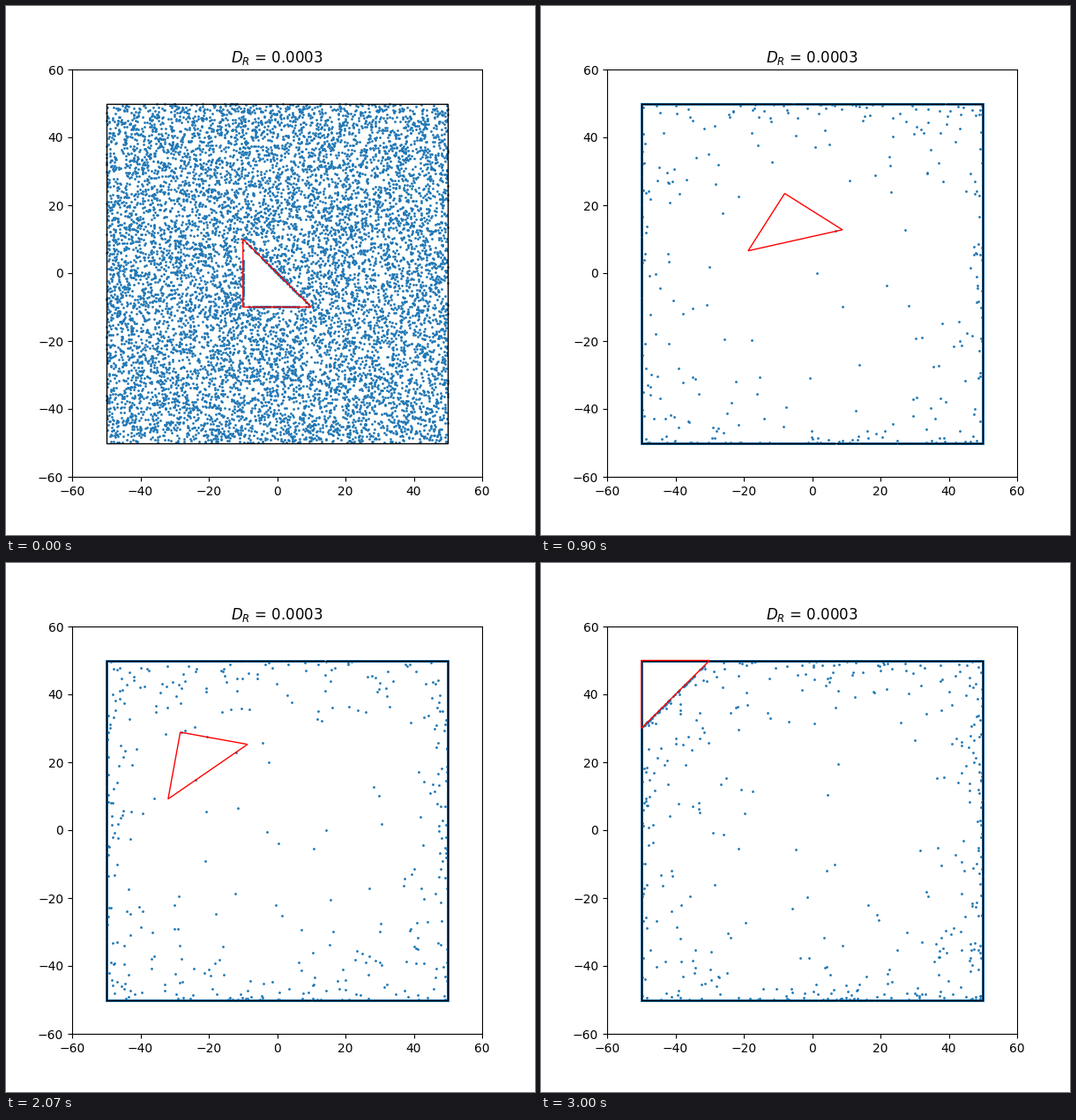
A matplotlib script for the animation above (3030 ms loop, 600 by 600 pixels).

```python
import numpy as np
import matplotlib.pyplot as plt
from matplotlib.animation import FuncAnimation
from matplotlib.patches import Polygon, Rectangle

FRAMES, INTERVAL = 101, 30
COUNT, HALF = 10000, 50
SPEED, D_ROT, SUBSTEPS = 7.0, 0.03, 8    # per frame

# Obstacle pose: time, centroid x, centroid y, turn in degrees
POSES = np.array([
    (0, -3.33, -3.33, 0),
    (21, -3.13, 11.33, -124.7),
    (39, -8.80, 17.23, -120),
    (53, -14.93, 24.00, -116.2),
    (69, -22.97, 21.10, -100.3),
    (82, -31.27, 24.87, -100.4),
    (98, -43.33, 43.33, -90),
])
SHAPE = np.array([(-10, 10), (-10, -10), (10, -10)]) + 10 / 3


def triangle(t):
    x, y, turn = (np.interp(t, POSES[:, 0], col) for col in POSES[:, 1:].T)
    c, s = np.cos(np.radians(turn)), np.sin(np.radians(turn))
    return SHAPE @ np.array([(c, s), (-s, c)]) + (x, y)


def push_out(pos, tri):
    """Move points inside the triangle to its nearest reachable edge."""
    edges = np.roll(tri, -1, axis=0) - tri
    normals = np.stack([edges[:, 1], -edges[:, 0]], axis=1)
    normals /= np.linalg.norm(normals, axis=1, keepdims=True)
    depth = np.einsum('pej,ej->pe', tri - pos[:, None], normals)
    hit = np.flatnonzero((depth > 0).all(axis=1))
    landing = pos[hit, None] + depth[hit, :, None] * normals
    blocked = (np.abs(landing) > HALF - 0.3).any(axis=2)
    best = np.argmin(depth[hit] + 1000 * blocked, axis=1)
    pos[hit] = landing[np.arange(len(hit)), best]


def simulate():
    rng = np.random.default_rng(3)
    pos = rng.uniform(-HALF, HALF, (COUNT, 2))
    heading = rng.uniform(0, 2 * np.pi, COUNT)
    push_out(pos, triangle(0))
    track = [pos.copy()]
    for step in range(1, (FRAMES - 1) * SUBSTEPS + 1):
        heading += rng.normal(0, np.sqrt(2 * D_ROT / SUBSTEPS), COUNT)
        pos += SPEED / SUBSTEPS * np.stack([np.cos(heading), np.sin(heading)], axis=1)
        np.clip(pos, -HALF, HALF, out=pos)
        push_out(pos, triangle(step / SUBSTEPS))
        np.clip(pos, -HALF, HALF, out=pos)
        if step % SUBSTEPS == 0:
            track.append(pos.copy())
    return track


track = simulate()

fig, ax = plt.subplots(figsize=(6, 6), dpi=100)
ax.set(xlim=(-60, 60), ylim=(-60, 60))
ax.set_title(r'$D_R$ = 0.0003')
dots, = ax.plot([], [], 'o', ms=1, color='C0', zorder=2)
ax.add_patch(Rectangle((-HALF, -HALF), 2 * HALF, 2 * HALF, fill=False, ec='k', lw=1, zorder=3))
obstacle = ax.add_patch(Polygon(triangle(0), fill=False, ec='r', lw=1, zorder=4))


def update(i):
    dots.set_data(*track[i].T)
    obstacle.set_xy(triangle(i))
    return dots, obstacle


anim = FuncAnimation(fig, update, frames=FRAMES, interval=INTERVAL, repeat=True, repeat_delay=0)
plt.show()
```
